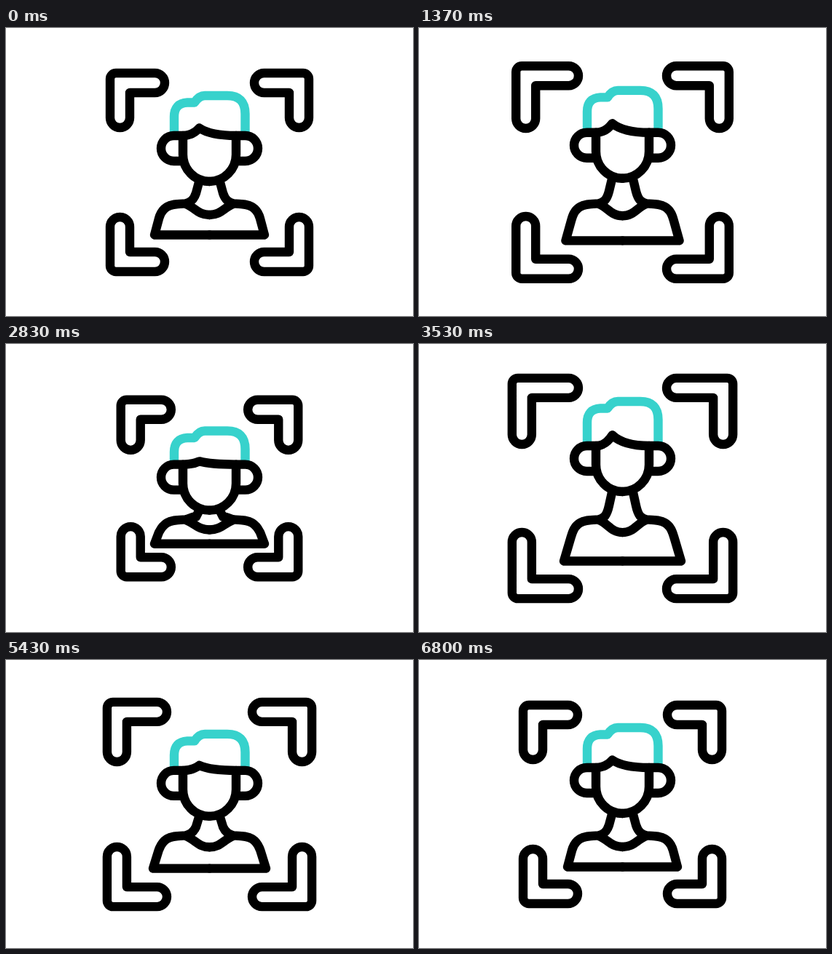
Recreate the animation shown at these times as an HTML page. Size 559 by 396 pixels, loop 6830 ms.

```html
<!DOCTYPE html>
<html lang="en">
<head>
<meta charset="utf-8">
<title>Face scan</title>
<style>
  html, body { margin: 0; width: 100%; height: 100%; overflow: hidden; background: #fff; }
  svg { display: block; width: 559px; height: 396px; }
  path { fill: none; stroke: #000; stroke-width: 12.4; stroke-linejoin: round; stroke-linecap: round; }
  #hair { stroke: #37d2cc; stroke-linecap: butt; }
</style>
</head>
<body>
<svg viewBox="0 0 559 396">
  <path id="hair"/>
  <g id="half">
    <path id="body"/>
    <path id="head"/>
    <path id="topCorner"/>
    <path id="lowCorner" transform="matrix(1 0 0 -1 0 397)"/>
  </g>
  <use href="#half" transform="matrix(-1 0 0 1 559 0)"/>
  <path id="fringe"/>
</svg>
<script>
const CYCLE = 6830 / 3;

// time, corner spread, arm growth, head drop, hair drop, base drop, base widening
const KEYS = [
  [0, 0, 0, 0, 0, 0, 0],
  [40, 0, 0, 0, 0, 0, 0],
  [600, -15, 9, 18, 27, -10, 0],
  [700, -12, 7, 15.5, 23, -8, 0],
  [876, 4, 3, 4, 9, 2, 2],
  [1046, 12, 2, -4, -6, 9, 4],
  [1215, 15.7, 1, -8.3, -14.5, 14.3, 5.3],
  [1253, 15.2, 1, -8, -14, 14, 5],
  [1400, 8, 1, -3, -5, 6, 2],
  [1540, -4, 2, 4, 6, -3, 0],
  [1800, 8, 0, -1, 0, 4, 1],
  [1930, 6.2, 0, 0.5, 2, 3, 1],
  [2110, 0, 0, 0, 0, 0, 0],
  [CYCLE, 0, 0, 0, 0, 0, 0]
];

const slope = (i, c) => (KEYS[i + 1][c] - KEYS[i][c]) / (KEYS[i + 1][0] - KEYS[i][0]);

// Tangents that never overshoot a key
function tangent(i, c) {
  if (i === 0 || i === KEYS.length - 1) return 0;
  const a = slope(i - 1, c), b = slope(i, c);
  return a * b > 0 ? 2 * a * b / (a + b) : 0;
}

function poseAt(time) {
  const i = KEYS.findIndex((key, k) => time < KEYS[k + 1][0]);
  const from = KEYS[i], to = KEYS[i + 1];
  const span = to[0] - from[0], u = (time - from[0]) / span, v = 1 - u;
  return from.slice(1).map((start, k) => {
    const c = k + 1;
    return start * v * v * (1 + 2 * u) + to[c] * u * u * (3 - 2 * u)
      + span * u * v * (v * tangent(i, c) - u * tangent(i + 1, c));
  });
}

const setPath = (id, d) => document.getElementById(id).setAttribute("d", d);

function draw([spread, grow, head, hair, base, widen]) {
  const end = 61.5 + spread + grow;
  const corner = `M${143 - spread} ${62 - spread} m8 0 h${end - 8}
    a13.5 13.5 0 0 1 0 27 h${27 - end} v${end - 27}
    a13.5 13.5 0 0 1 -27 0 v${8 - end} a8 8 0 0 1 8 -8z`;
  setPath("topCorner", corner);
  setPath("lowCorner", corner);

  const brow = 148 + head;
  setPath("head", `M243 ${brow} h-12.5 a17.5 17.5 0 0 0 0 35 H243
    M243 ${brow} v26 a36.5 37 0 0 0 36.5 37`);
  const rise = 10.5 + 0.7 * (head - hair);
  setPath("fringe", `M243 ${brow} c9 0 17 ${-rise * 0.4} 22.5 ${-rise}
    c10 ${rise * 0.65} 28 ${rise} 50.5 ${rise}`);

  const top = 93 + hair;
  setPath("hair", `M231 ${brow - 5} V${top + 29} q0 -18.5 18 -19.5 h10
    q6 -9.5 14 -9.5 H304 q24.5 0 24.5 25 V${brow - 5}`);

  const bottom = 284.5 + base;
  setPath("body", `M265 ${212 + head} L261 ${227 + head * 0.6} C258 236 254 240 246 241.5
    C236 242 227 242 221 246 C213 251 211 258 ${210 - widen * 0.3} ${262 + base * 0.3}
    L${204 - widen} ${bottom} H279.5
    M247 242 C260 247 264 ${257 + base * 0.15} 279.5 ${257 + base * 0.15}`);
}

function frame(now) {
  draw(poseAt(now % CYCLE));
  requestAnimationFrame(frame);
}
draw(poseAt(0));
requestAnimationFrame(frame);
</script>
</body>
</html>
```
